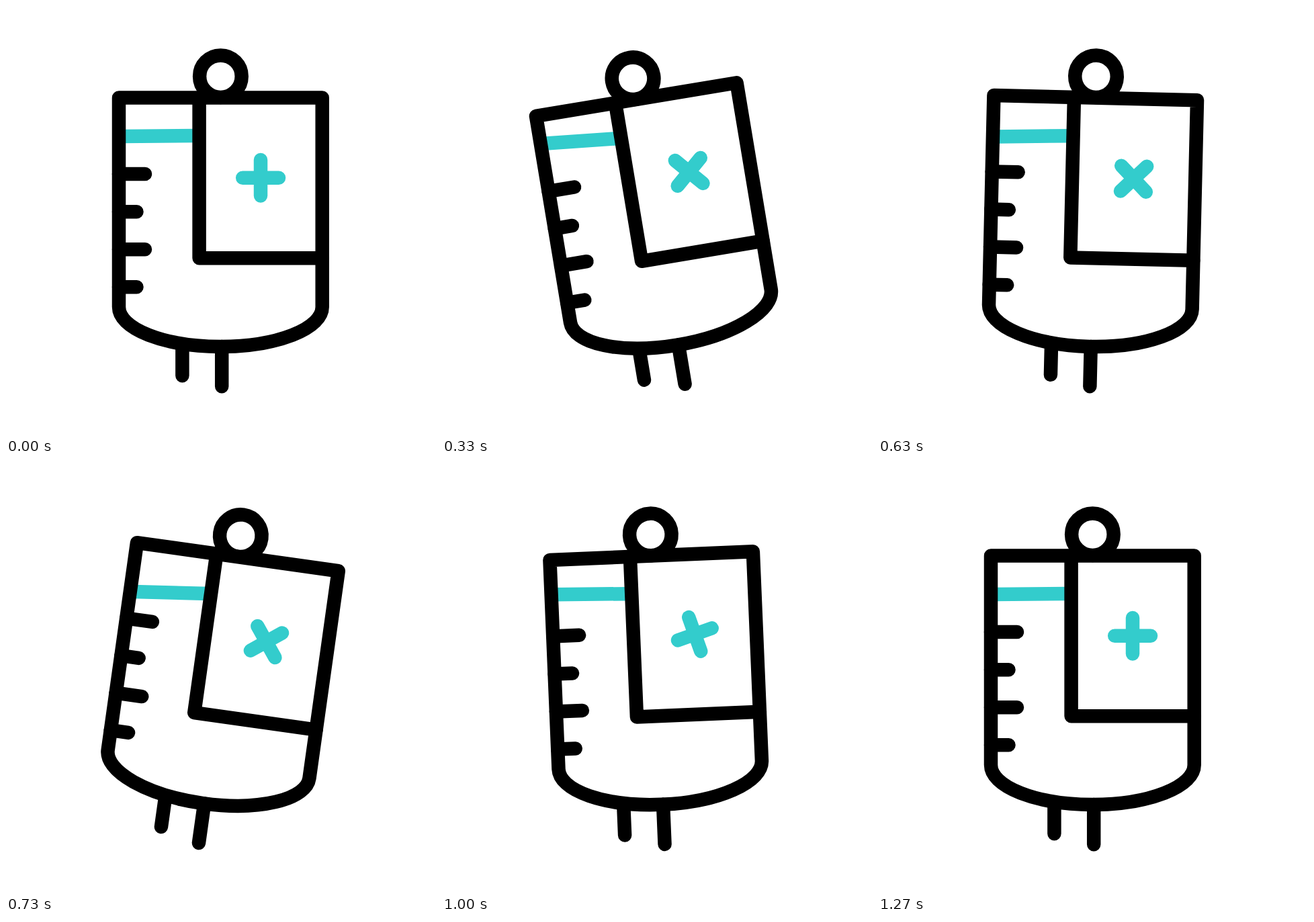
Recreate the animation shown at these times as an HTML page. Size 640 by 640 pixels, loop 1670 ms.

```html
<!DOCTYPE html>
<html>
<head>
<meta charset="utf-8">
<style>
  html, body { margin: 0; height: 100%; overflow: hidden; background: #fff; }
  svg { display: block; width: 100%; height: 100%; }
</style>
</head>
<body>
<svg viewBox="0 0 640 640" fill="none" stroke="#000" stroke-width="20.5" stroke-linecap="round" stroke-linejoin="round">
  <g id="bag">
    <path id="level" d="M172 192.7H284" stroke="#3cc" stroke-linecap="butt"/>
    <path id="cross" d="M379 229V282.6M352.2 255.8H406" stroke="#3cc"/>
    <circle cx="319.4" cy="104.7" r="31.3"/>
    <path d="M168 136.5H470.7V448A151.35 59 0 0 1 168 448Z"/>
    <path d="M287.6 136.5V375.2H470.7"/>
    <path d="M168 250H207M168 306.2H194.5M168 362.2H207M168 418.3H194.5"/>
    <path d="M262.4 504V550.3M321.2 507V566.2"/>
  </g>
</svg>
<script>
const LOOP = 1670, FPS = 30;
// Turning points of the swing, in steps of 1/30 s
const times = [3.65, 14, 21.85, 31.7, 37.6];
const parts = [
  { id: 'bag', pivot: '320 320', angles: [0, -14.15, 8, -3.3, 0] },
  { id: 'level', pivot: '319.4 192.7', angles: [-0.5, 8.4, -6.5, 2.6, -0.5] },
  { id: 'cross', pivot: '379 255.8', angles: [0, -62, -37, -15.5, 0] }
].map(part => ({ ...part, node: document.getElementById(part.id) }));

const smooth = u => u * u * (3 - 2 * u);

function angleAt(step, angles) {
  if (step <= times[0]) return angles[0];
  const i = times.findIndex(time => time > step);
  if (i < 0) return angles[angles.length - 1];
  const u = (step - times[i - 1]) / (times[i] - times[i - 1]);
  return angles[i - 1] + (angles[i] - angles[i - 1]) * smooth(u);
}

const start = performance.now();

function draw() {
  const ms = (performance.now() - start) % LOOP;
  const step = Math.floor((ms + 4) * FPS / 1000);
  for (const { node, pivot, angles } of parts)
    node.setAttribute('transform', `rotate(${angleAt(step, angles)} ${pivot})`);
  requestAnimationFrame(draw);
}
draw();
</script>
</body>
</html>
```
